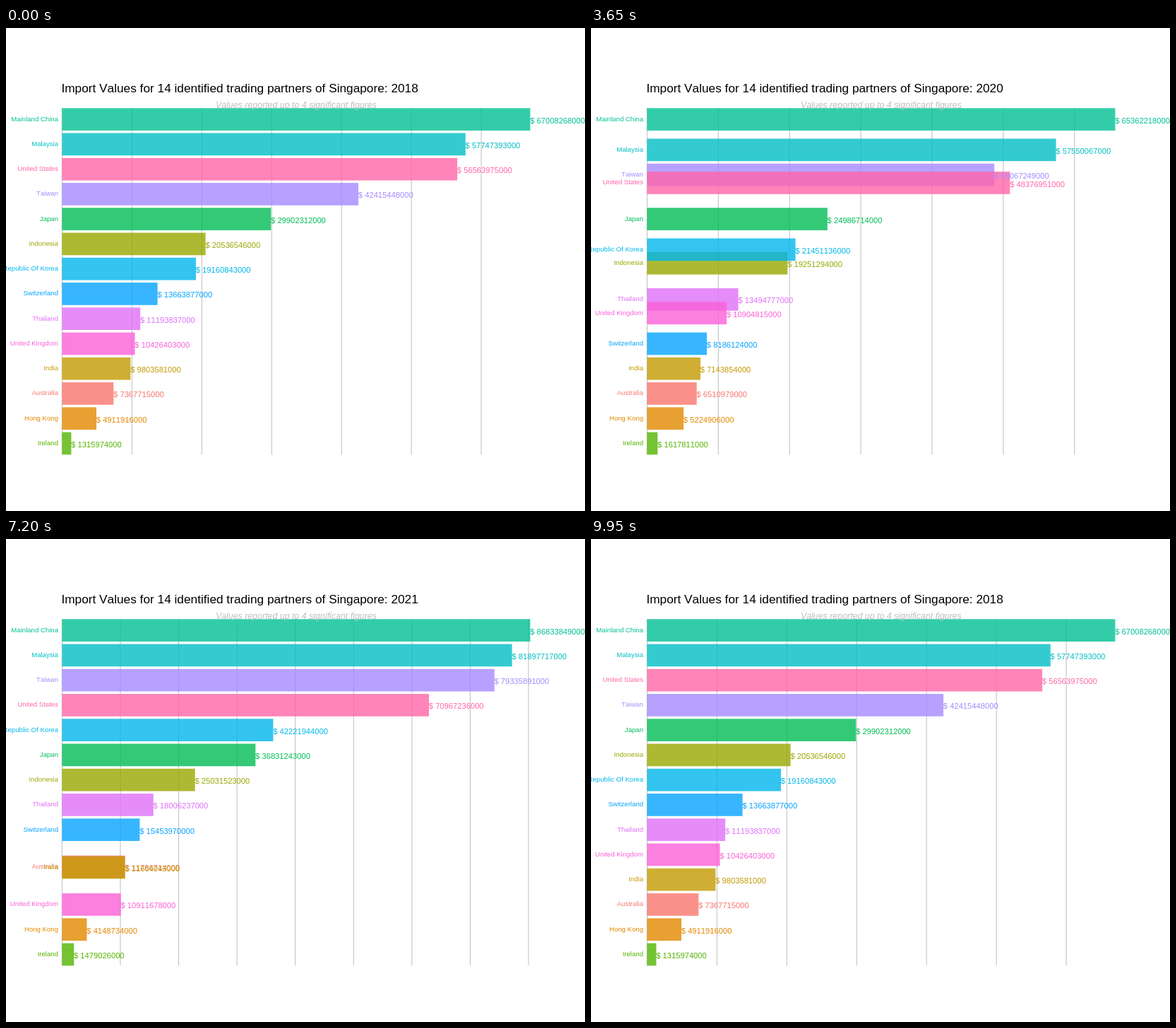
Recreate the animation shown at these times as an HTML page with a canvas. Size 820 by 683 pixels, loop 10 s.

```html
<!DOCTYPE html>
<html lang="en">
<head>
<meta charset="utf-8">
<title>Import values</title>
<style>
  html, body { margin: 0; overflow: hidden; background: #fff; }
  canvas { display: block; }
</style>
</head>
<body>
<canvas id="stage" width="820" height="683"></canvas>
<script>
const ctx = document.getElementById('stage').getContext('2d');
const FONT = '"Liberation Sans", Arial, sans-serif';

// Name, colour, import values in thousands for 2018 to 2022
const partners = [
  ['Australia', '#F8766D', 7367715, 8535610, 6510979, 9719537, 11786714],
  ['Hong Kong', '#E38900', 4911916, 4763716, 5224906, 4361208, 4148734],
  ['India', '#C49A00', 9803581, 8685506, 7143854, 9884432, 11664043],
  ['Indonesia', '#99A800', 20536546, 21292340, 19251294, 20422717, 25031523],
  ['Ireland', '#53B400', 1315974, 997080, 1617811, 2632162, 1479026],
  ['Japan', '#00BC56', 29902312, 26427086, 24986714, 29271378, 36831243],
  ['Mainland China', '#00C094', 67008268, 66890480, 65362218, 73313680, 86833849],
  ['Malaysia', '#00BFC4', 57747393, 56873014, 57550067, 72130549, 81897717],
  ['Republic Of Korea', '#00B6EB', 19160843, 18691058, 21451136, 29796218, 42221944],
  ['Switzerland', '#06A4FF', 13663877, 9088708, 8186124, 11040288, 15453970],
  ['Taiwan', '#A58AFF', 42415448, 44167777, 50067249, 68625685, 79335891],
  ['Thailand', '#DF70F8', 11193837, 10444987, 13494777, 13163114, 18006237],
  ['United Kingdom', '#FB61D7', 10426403, 12073397, 10904815, 9210941, 10911678],
  ['United States', '#FF66A8', 56563975, 59712562, 48376951, 54349255, 70967236],
].map(([name, color, ...values]) => ({ name, color, values }));

for (const p of partners) {
  p.ranks = p.values.map((v, year) => partners.filter(q => q.values[year] > v).length);
}

const STEP_MS = 50, STEPS = 200, YEARS = 5;
const moveStart = [8, 49, 89, 128, 168];
const moveEnd = [40, 80, 119, 159, 199];
const LEFT = 79.4, WIDTH = 663, TOP = 113.3, HEIGHT = 490;
const ROW = HEIGHT / 13.9, BAR = ROW * 0.9, GRID = 1e7;

const mix = (a, b, p) => a + (b - a) * p;

function text(str, x, y, size, color, align = 'left', style = '') {
  ctx.font = `${style} ${size}px ${FONT}`;
  ctx.fontKerning = 'none';
  ctx.textAlign = align;
  ctx.fillStyle = color;
  ctx.fillText(str, x, y);
}

function draw(step) {
  let from = 0;
  while (from < YEARS - 1 && step >= moveEnd[from]) from++;
  const to = (from + 1) % YEARS;
  const span = moveEnd[from] - moveStart[from];
  const progress = Math.min(1, Math.max(0, (step - moveStart[from]) / span));
  const labelYear = progress < 0.5 ? from : to;
  const titleYear = 2018 + Math.floor((step + 15) / 40) % YEARS;

  const rows = partners.map(({ name, color, values, ranks }) => ({
    name, color,
    value: mix(values[from], values[to], progress),
    y: TOP + ROW * mix(ranks[from], ranks[to], progress),
    label: `$ ${values[labelYear]}000`,
  }));
  const max = Math.max(...rows.map(r => r.value));
  const xOf = value => LEFT + value / max * WIDTH;

  ctx.fillStyle = '#fff';
  ctx.fillRect(0, 0, 820, 683);

  ctx.fillStyle = '#bebebe';
  for (let v = 0; v <= max; v += GRID) ctx.fillRect(xOf(v) - 0.5, TOP, 1, HEIGHT);

  ctx.globalAlpha = 0.8;
  for (const { color, value, y } of rows) {
    ctx.fillStyle = color;
    ctx.fillRect(LEFT, y, xOf(value) - LEFT, BAR);
  }
  ctx.globalAlpha = 1;

  for (const { name, color, y } of rows) text(name, 74, y + 18.2, 9.6, color, 'right');
  for (const { label, color, value, y } of rows) text(label, xOf(value) - 0.2, y + 21.4, 11.2, color);

  text(`Import Values for 14 identified trading partners of Singapore: ${titleYear}`,
    LEFT - 1, 91, 17.25, '#000');
  text('Values reported up to 4 significant figures', LEFT + WIDTH / 2, 112.5, 12.4,
    '#bebebe', 'center', 'italic');
}

function tick() {
  draw(Math.floor(performance.now() / STEP_MS) % STEPS);
  requestAnimationFrame(tick);
}
tick();
</script>
</body>
</html>
```
